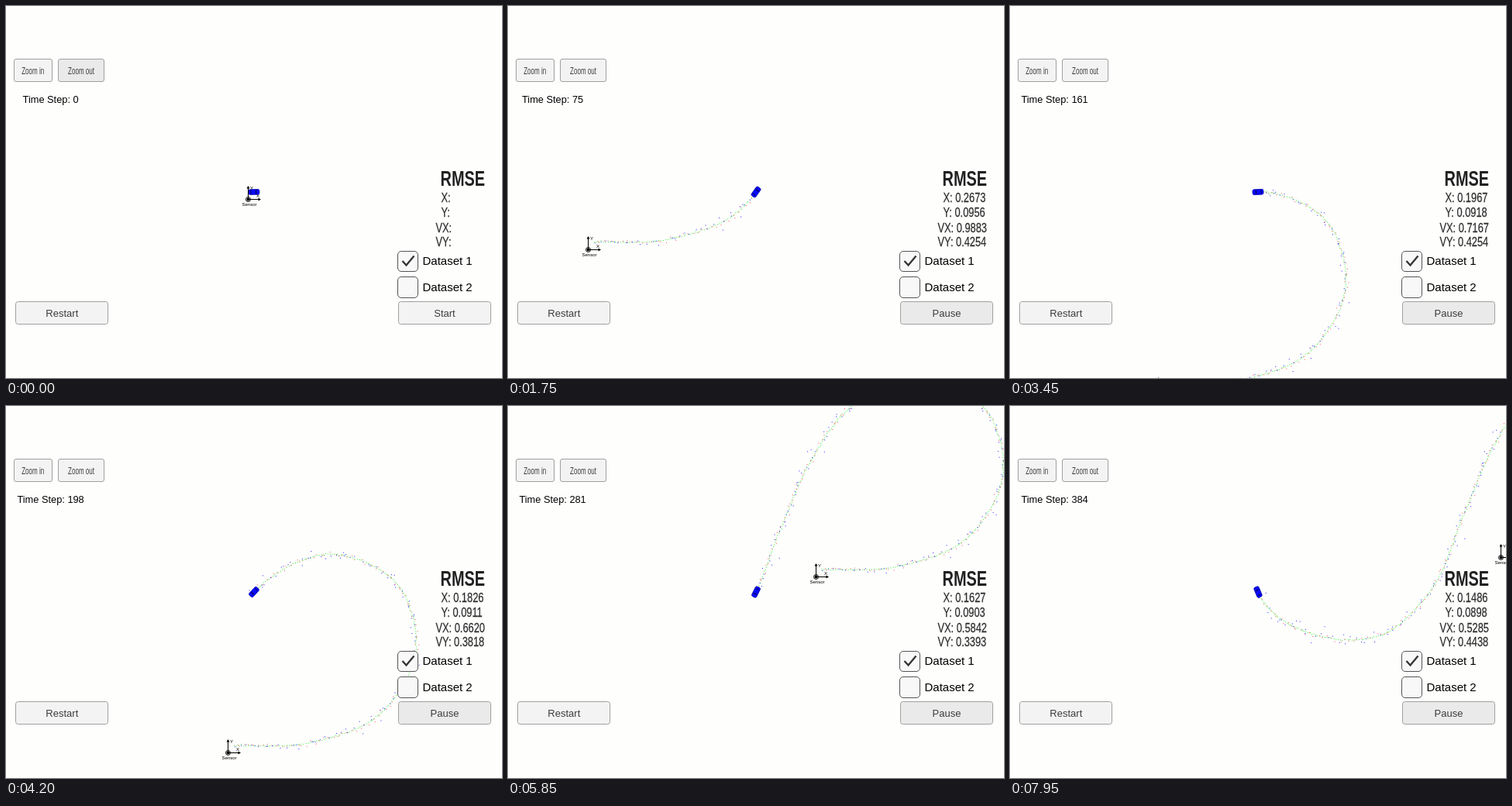
Animation, 640 px wide and 480 px high, one loop 8 s. Source, as an HTML page with a canvas:

```html
<!DOCTYPE html>
<html lang="en">
<head>
<meta charset="utf-8">
<title>Tracking simulator</title>
<style>
  html, body { margin: 0; width: 640px; height: 480px; overflow: hidden; background: #fefefd; }
  canvas, svg { position: absolute; left: 0; top: 0; }
  text { font: 13px "Liberation Sans", Arial, sans-serif; fill: #3c3c3c; }
  .mid { text-anchor: middle; }
  .button { fill: #f3f3f3; stroke: #a0a0a0; }
  .button.hover { fill: #eaeaea; }
  .box { fill: #f8f8f8; stroke: #555; }
  .dark { fill: #000; }
  .zoom { font-size: 12px; }
  .title { font-size: 28.5px; font-weight: bold; fill: #222; }
  .value { font-size: 17px; fill: #2c2c2c; stroke: #2c2c2c; stroke-width: .25px; }
</style>
</head>
<body>
<canvas id="world" width="640" height="480"></canvas>
<svg width="640" height="480">
  <rect class="button" x="10.5" y="68.5" width="49" height="29" rx="2.5"/>
  <rect class="button" id="zoomOut" x="67.5" y="68.5" width="59" height="29" rx="2.5"/>
  <text class="mid zoom" transform="translate(34.7 88) scale(.67 1)">Zoom in</text>
  <text class="mid zoom" transform="translate(97 88) scale(.67 1)">Zoom out</text>
  <text class="mid dark" id="step" x="57.6" y="124.5" style="font-size:12.8px"></text>

  <text class="title" transform="translate(560.5 231.5) scale(.7 1)">RMSE</text>
  <text class="value" transform="translate(561.5 252.5) scale(.755 1)"></text>
  <text class="value" transform="translate(561.5 271.5) scale(.755 1)"></text>
  <text class="value" transform="translate(554.5 291.5) scale(.755 1)"></text>
  <text class="value" transform="translate(554.5 309.5) scale(.755 1)"></text>

  <rect class="box" x="505.5" y="316.5" width="26" height="26" rx="4.5"/>
  <rect class="box" x="505.5" y="349.5" width="26" height="27" rx="4.5"/>
  <path d="M511.5 329l5 5.5 10-12" fill="none" stroke="#333" stroke-width="2.3"/>
  <text class="dark" x="537.5" y="334" style="font-size:15px">Dataset 1</text>
  <text class="dark" x="537.5" y="367.5" style="font-size:15px">Dataset 2</text>

  <rect class="button" x="12.5" y="381.5" width="119" height="29" rx="3"/>
  <rect class="button" id="run" x="506.5" y="381.5" width="119" height="29" rx="3"/>
  <text class="mid" x="72.3" y="401">Restart</text>
  <text class="mid" id="runLabel" x="566" y="401"></text>
</svg>
<script>
const LOOP = 8000, LAST_STEP = 384, SPACING = 32;
const byId = id => document.getElementById(id);
const ctx = byId('world').getContext('2d');
const values = document.querySelectorAll('.value');

// Car positions relative to the sensor, SPACING steps apart; the ends only guide the curve.
const waypoints = [
  [-88, -9], [8, -9], [106, -13], [195, -49], [242, -131], [217, -219], [132, -256], [46, -219],
  [-9, -143], [-48, -53], [-87, 38], [-155, 101], [-246, 98], [-313, 45], [-322, -82]
];

function spline([a, b, c, d], u) {
  return b + u / 2 * (c - a + u * (2 * a - 5 * b + 4 * c - d + u * (3 * (b - c) + d - a)));
}

function trackAt(step) {
  const i = Math.min(Math.floor(step / SPACING), waypoints.length - 4);
  const [x, y] = [0, 1].map(axis =>
    spline(waypoints.slice(i, i + 4).map(p => p[axis]), step / SPACING - i));
  return { x, y };
}

let seed = 7;
const random = () => (seed = seed * 16807 % 2147483647) / 2147483647;
const gauss = sigma => sigma * Math.sqrt(-2 * Math.log(random())) * Math.cos(2 * Math.PI * random());
const scatter = ({ x, y }, sigma) => ({ x: x + gauss(sigma), y: y + gauss(sigma) });

// Lidar has plain position noise, radar has range and bearing noise.
function measure(point, step) {
  if (step % 2 === 0) return { ...scatter(point, 1.7), color: '#f55' };
  const range = Math.hypot(point.x, point.y) + gauss(3);
  const angle = Math.atan2(point.y, point.x) + gauss(.022);
  return { x: range * Math.cos(angle), y: range * Math.sin(angle), color: '#22f' };
}

const track = Array.from({ length: LAST_STEP + 1 }, (_, step) => trackAt(step));
const readings = track.map(measure);
const estimates = track.map(point => ({ ...scatter(point, .4), color: '#3e3' }));

// An initial error that averages out over n steps, plus a steady one.
const settling = (initial, steady) => n => Math.sqrt(initial / n + steady);
const rmse = {
  X: settling(4.6, .0101),
  Y: settling(.1, .0078),
  VX: settling(65, .11),
  VY: n => Math.sqrt(.155 + .045 * Math.cos((n - 118) / 45))
};

function drawDot({ x, y, color }, size) {
  ctx.fillStyle = color;
  ctx.fillRect(x - size / 2, y - size / 2, size, size);
}

function drawSensor() {
  ctx.strokeStyle = ctx.fillStyle = '#000';
  ctx.lineWidth = 1;
  ctx.beginPath();
  ctx.moveTo(0, 0); ctx.lineTo(0, -16);
  ctx.moveTo(0, 0); ctx.lineTo(15, 0);
  ctx.moveTo(3, 0); ctx.arc(0, 0, 3, 0, 7);
  ctx.stroke();
  ctx.beginPath();
  ctx.arc(0, 0, 2, 0, 7);
  ctx.moveTo(0, -17.5); ctx.lineTo(-2, -14); ctx.lineTo(2, -14);
  ctx.moveTo(16.5, 0); ctx.lineTo(13, -2); ctx.lineTo(13, 2);
  ctx.fill();
  ctx.font = '6px "Liberation Sans", Arial, sans-serif';
  ctx.textAlign = 'center';
  ctx.fillText('Y', 4.5, -12.5);
  ctx.fillText('X', 12.5, -2.5);
  ctx.fillText('Sensor', 1.5, 8.5);
}

function drawCar(step) {
  const here = trackAt(step), next = trackAt(step + .5);
  ctx.save();
  ctx.translate(320, 240);
  ctx.rotate(Math.atan2(next.y - here.y, next.x - here.x));
  ctx.fillStyle = '#0a0aff';
  ctx.strokeStyle = '#0000a0';
  ctx.lineWidth = .7;
  ctx.beginPath();
  ctx.roundRect(-7, -3.4, 14, 6.8, 2);
  ctx.fill();
  ctx.stroke();
  ctx.fillStyle = '#00004a';
  ctx.fillRect(2, -2.4, 1.2, 4.8);
  ctx.fillRect(-4.6, -2.2, 1, 4.4);
  ctx.restore();
}

function render(time) {
  // Pictures come at 15 per second, shown on a 50 ms grid.
  const picture = Math.ceil((Math.floor(time / 50) + .5) * .75) - 1;
  const step = Math.max(0, Math.floor(3.32 * picture - 11));
  const running = step > 0;
  const car = track[step];

  ctx.clearRect(0, 0, 640, 480);
  ctx.save();
  ctx.translate(320 - car.x, 240 - car.y);
  for (let i = 0; running && i <= step; i++) {
    drawDot(estimates[i], 1);
    drawDot(readings[i], 1);
  }
  ctx.restore();
  drawCar(step);
  ctx.save();
  ctx.translate(Math.round(320 - car.x) + .5, Math.round(240 - car.y) + .5);
  drawSensor();
  ctx.restore();

  byId('step').textContent = 'Time Step: ' + step;
  byId('zoomOut').classList.toggle('hover', picture < 1);
  byId('run').classList.toggle('hover', picture > 1);
  byId('runLabel').textContent = running ? 'Pause' : 'Start';
  Object.entries(rmse).forEach(([name, error], i) => {
    values[i].textContent = name + ':' + (running ? ' ' + error(step).toFixed(4) : '');
  });
}

function tick() {
  render(performance.now() % LOOP);
  requestAnimationFrame(tick);
}
tick();
</script>
</body>
</html>
```
